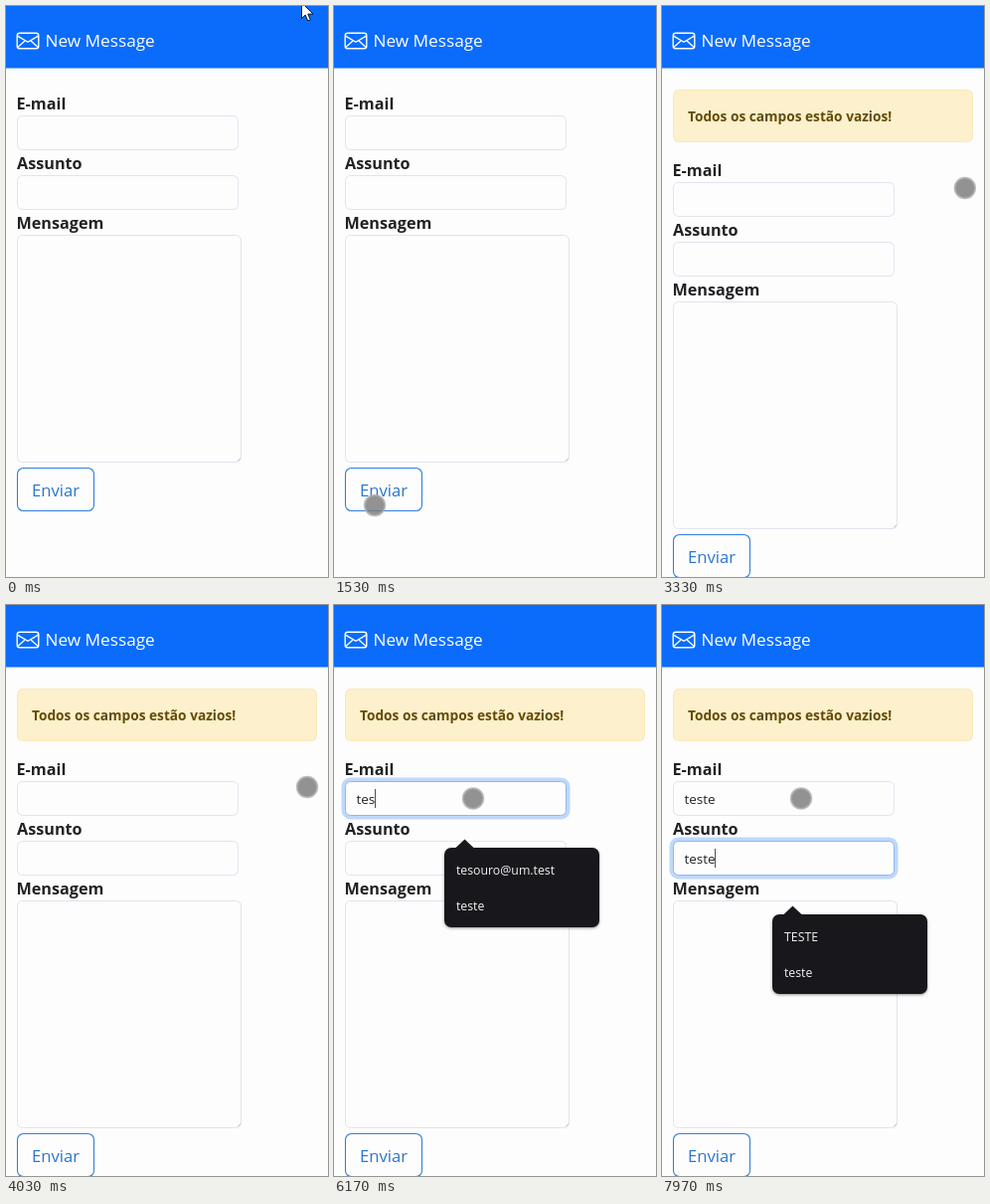
Recreate the animation shown at these times as an HTML page with a canvas. Size 324 px wide and 574 px high, loop 8000 ms.

```html
<!DOCTYPE html>
<html lang="pt-BR">
<head>
<meta charset="utf-8">
<title>New Message</title>
<style>
  html, body { margin: 0; width: 100%; height: 100%; overflow: hidden; background: #fdfdfd; }
  canvas { display: block; width: 324px; height: 574px; }
</style>
</head>
<body>
<canvas id="stage"></canvas>
<script>
const W = 324, H = 574, LOOP = 8000;
const FONT = '"Open Sans", "Noto Sans", sans-serif';
const INK = '#212224', LINE = '#e2e3ee', PAGE = '#fdfdfd';

const canvas = document.getElementById('stage');
const ctx = canvas.getContext('2d');
const dpr = window.devicePixelRatio || 1;
canvas.width = W * dpr;
canvas.height = H * dpr;

// Event times in ms
const ALERT_AT = 1900, FOCUS_MAIL = 4985, FOCUS_SUBJECT = 7000;
const mailKeys = [5500, 5800, 6040, 6300, 6520];
const subjectKeys = [7350, 7560, 7680, 7800, 7920];
const WORD = 'teste';

const recent = [
  'tesouro@um.test', 'qw', 'nuvemmansa4826@mar.test', 'qwd',
  'campoamarelo5193@lago.test', 'nuvemmansa48@hwbm.test'
];

// Pointer path: time, x, y; eased between points
const path = [
  [0, 297, -4], [100, 297, -4], [1430, 41, 502], [1750, 41, 502],
  [2050, 57, 485], [2540, 57, 485], [3260, 305, 183], [3700, 303, 183],
  [4200, 303, 183], [4850, 140, 194.5], [LOOP, 140, 194.5]
];

const clamp = v => Math.max(0, Math.min(1, v));
const ease = v => v * v * (3 - 2 * v);
const typed = (keys, t) => WORD.slice(0, keys.filter(k => k <= t).length);

function text(str, x, y, size, color, weight = 400) {
  ctx.font = `${weight} ${size}px ${FONT}`;
  ctx.fillStyle = color;
  ctx.fillText(str, x, y);
  return ctx.measureText(str).width;
}

function box(x, y, w, h, r, fill, stroke, width = 1) {
  ctx.beginPath();
  ctx.roundRect(x, y, w, h, r);
  if (fill) { ctx.fillStyle = fill; ctx.fill(); }
  if (stroke) { ctx.strokeStyle = stroke; ctx.lineWidth = width; ctx.stroke(); }
}

function lines(points, color, width) {
  ctx.beginPath();
  points.forEach(([x, y], i) => i ? ctx.lineTo(x, y) : ctx.moveTo(x, y));
  ctx.strokeStyle = color;
  ctx.lineWidth = width;
  ctx.stroke();
}

function header() {
  ctx.fillStyle = '#0b6cfc';
  ctx.fillRect(0, 0, W, 62.5);
  box(11.2, 27.2, 21.6, 15.6, 2.6, null, '#fff', 1.4);
  lines([[11.6, 30.1], [22, 36.3], [32.4, 30.1]], '#fff', 1.4);
  lines([[11.8, 41.5], [19, 34.9]], '#fff', 1.3);
  lines([[32.2, 41.5], [25, 34.9]], '#fff', 1.3);
  text('New Message', 39.5, 41, 17.2, '#fff');
}

// focus runs from 0 to 1; caret is drawn when caretOn
function field(y, value, focus, caretOn) {
  if (focus > 0) {
    ctx.globalAlpha = focus;
    box(9.5, y - 2, 226, 38, 7, null, '#bfd8fc', 4);
    ctx.globalAlpha = 1;
  }
  box(11.5, y, 222, 34, 5, PAGE, LINE);
  if (focus > 0) {
    ctx.globalAlpha = focus;
    box(11.5, y, 222, 34, 5, null, '#8cb8f4');
    ctx.globalAlpha = 1;
  }
  const w = value ? text(value, 22.5, y + 22.5, 13.5, INK) : 0;
  if (caretOn) {
    ctx.fillStyle = '#505154';
    ctx.fillRect(Math.round(22 + w), y + 7.5, 1, 19);
  }
}

function caretVisible(t, start, keys) {
  const last = keys.filter(k => k <= t).pop() || start;
  return t >= start && (t - last) % 1000 < 500;
}

function form(t) {
  const shift = t >= ALERT_AT ? 67 : 0;
  if (shift) {
    box(11.5, 84.5, 301, 52, 5, '#fdf0cc', '#fce8b8');
    text('Todos os campos estão vazios!', 26, 116, 13.7, '#644c08', 700);
  }
  ctx.save();
  ctx.translate(0, shift);
  text('E-mail', 10.5, 104, 16.2, INK, 700);
  text('Assunto', 11, 164, 16.2, INK, 700);
  text('Mensagem', 10.5, 224, 16.2, INK, 700);

  const mailOn = t >= FOCUS_MAIL && t < FOCUS_SUBJECT;
  const fade = clamp((t - FOCUS_SUBJECT) / 150);
  const mailFocus = mailOn ? clamp((t - FOCUS_MAIL) / 150) : t >= FOCUS_SUBJECT ? 1 - fade : 0;
  field(110.5, typed(mailKeys, t), mailFocus, mailOn && caretVisible(t, FOCUS_MAIL, mailKeys));
  field(170.5, typed(subjectKeys, t), fade, caretVisible(t, FOCUS_SUBJECT, subjectKeys));

  box(11.5, 230.5, 225, 228, 5, null, LINE);
  lines([[233, 457.5], [236, 454.5]], '#a9a9ac', 0.8);
  box(11.5, 464.5, 77, 43, 6, null, '#337fd8', 1.1);
  text('Enviar', 26, 493, 16.6, '#2b75d0');
  ctx.restore();
}

function dropdown(x, y, w, items) {
  const h = items.length * 36 + 8, fill = '#18181c';
  ctx.save();
  ctx.shadowColor = 'rgba(30, 30, 40, 0.45)';
  ctx.shadowBlur = 3 * dpr;
  ctx.shadowOffsetY = dpr;
  box(x, y, w, h, 7, fill);
  ctx.restore();
  ctx.beginPath();
  ctx.moveTo(x + 11, y + 0.5);
  ctx.lineTo(x + 20.5, y - 8.5);
  ctx.lineTo(x + 30, y + 0.5);
  ctx.fillStyle = fill;
  ctx.fill();
  items.forEach((item, i) => text(item, x + 12, y + 27 + i * 36, 12.3, '#f2f2f4'));
}

function suggestions(t) {
  if (t >= subjectKeys[0]) dropdown(111, 311, 156, ['TESTE', 'teste']);
  else if (t >= FOCUS_SUBJECT) return;
  else if (t >= mailKeys[0]) dropdown(111, 244, 156, [recent[0], 'teste']);
  else if (t >= FOCUS_MAIL) dropdown(88, 244, 228, recent);
}

function arrow(x, y) {
  const shape = [[0, 0], [0, 16], [3.7, 12.6], [6.2, 18.4], [8.8, 17.2], [6.3, 11.6], [11.5, 11.6]];
  ctx.beginPath();
  shape.forEach(([dx, dy]) => ctx.lineTo(x + 0.5 + dx, y + 0.5 + dy));
  ctx.closePath();
  ctx.fillStyle = '#fff';
  ctx.fill();
  ctx.strokeStyle = '#111';
  ctx.lineWidth = 1;
  ctx.stroke();
}

function touch(x, y) {
  ctx.beginPath();
  ctx.arc(x, y, 10.2, 0, Math.PI * 2);
  ctx.fillStyle = 'rgba(122, 122, 122, 0.82)';
  ctx.fill();
  ctx.strokeStyle = 'rgba(174, 174, 174, 0.8)';
  ctx.lineWidth = 2;
  ctx.stroke();
}

function pointer(t) {
  const i = path.findIndex(p => p[0] > t);
  const [t0, x0, y0] = path[i - 1], [t1, x1, y1] = path[i];
  const k = ease((t - t0) / (t1 - t0));
  const x = x0 + (x1 - x0) * k, y = y0 + (y1 - y0) * k;
  const isArrow = t < 200 || (t >= ALERT_AT && t < 2560);
  (isArrow ? arrow : touch)(x, y);
}

function draw(now) {
  const t = now % LOOP;
  ctx.setTransform(dpr, 0, 0, dpr, 0, 0);
  ctx.fillStyle = PAGE;
  ctx.fillRect(0, 0, W, H);
  header();
  form(t);
  suggestions(t);
  pointer(t);
}

const start = performance.now();
function tick() {
  draw(performance.now() - start);
  requestAnimationFrame(tick);
}
tick();
</script>
</body>
</html>
```
